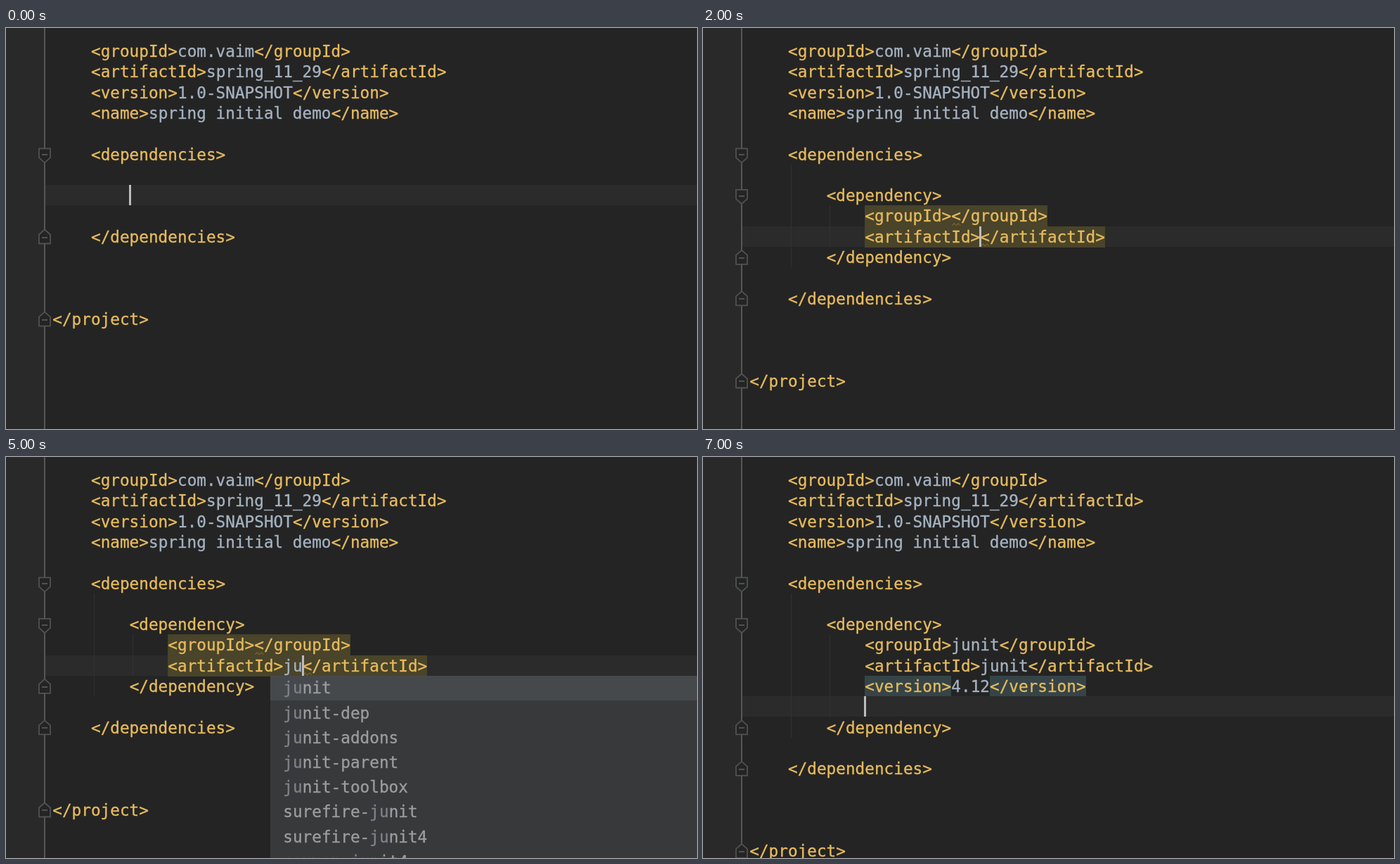
These frames come from a looping animation (983x570 px, 8000 ms). An HTML page with a canvas:

```html
<!DOCTYPE html>
<html lang="en">
<head>
<meta charset="utf-8">
<title>Adding a dependency</title>
<style>
  html, body { margin: 0; width: 100%; height: 100%; overflow: hidden; background: #242424; }
  canvas { display: block; }
</style>
</head>
<body>
<canvas id="stage" width="983" height="570"></canvas>
<script>
const ctx = document.getElementById('stage').getContext('2d');
const W = 983, H = 570;
const LEFT = 66.3, TOP = 18, CHAR = 13.667, LINE = 29.28, ITEM = 35.2;
const GUTTER_X = 55, STEP_MS = 1000;

const color = {
  back: '#242424', gutter: '#292929', rule: '#565656', fold: '#505252',
  row: '#2b2b2b', guide: '#303232', tag: '#e7bb5e', text: '#a5b2c1',
  caret: '#bcbcbc', field: '#49442a', pair: '#364447', wave: '#77602a',
  popup: '#37393b', hover: '#46494b', picked: '#0450a5',
  item: '#9b9da0', match: '#7e818a', pickable: '#b9bbbd'
};

const colX = col => LEFT + col * CHAR;
const rowY = row => TOP + row * LINE;

const head = [
  '    <groupId>com.vaim</groupId>',
  '    <artifactId>spring_11_29</artifactId>',
  '    <version>1.0-SNAPSHOT</version>',
  '    <name>spring initial demo</name>',
  '',
  '    <dependencies>',
  ''
];
const tail = ['', '    </dependencies>', '', '', '', '</project>'];

const tagLine = (name, value) => `            <${name}>${value}</${name}>`;
const dependency = (group, artifact, ...rest) => [
  '        <dependency>',
  tagLine('groupId', group),
  tagLine('artifactId', artifact),
  ...rest,
  '        </dependency>'
];

// Caret is [row, column]; fields marks the two editable template lines.
const blank = { body: [''], caret: [7, 8] };
const shortcut = { body: ['        dep'], caret: [7, 11] };
const template = { body: dependency('', ''), caret: [9, 24], fields: true };
const search = (typed, items) => ({
  body: dependency('', typed), caret: [9, 24 + typed.length], fields: true,
  popup: { x: 376, row: 10, typed, items, fill: color.hover }
});
const versions = {
  body: dependency('junit', 'junit', tagLine('version', '')),
  caret: [10, 21], fields: true,
  popup: {
    x: 335, row: 11, typed: '', fill: color.picked,
    items: ['4.12', '4.11', '4.11-beta-1', '4.10', '4.7', '4.4', '3.8.2']
  }
};
const done = {
  body: dependency('junit', 'junit', tagLine('version', '4.12'), ''),
  caret: [11, 12], pairs: [[12, 9], [25, 10]]
};

const steps = [
  blank,
  shortcut,
  template,
  search('gu', ['guava', 'guava-parent', 'guice-bean', 'guice-parent', 'guice-plexus',
    'sisu-guice', 'commons-configuration', 'mybatis-spring-boot-autoconfigure']),
  template,
  search('ju', ['junit', 'junit-dep', 'junit-addons', 'junit-parent', 'junit-toolbox',
    'surefire-junit', 'surefire-junit4', 'common-junit4']),
  versions,
  done
];

function rect(x, y, w, h, fill) {
  ctx.fillStyle = fill;
  ctx.fillRect(Math.round(x), Math.round(y), Math.round(w), Math.round(h));
}

function write(text, x, y, fill) {
  ctx.fillStyle = ctx.strokeStyle = fill;
  ctx.lineWidth = 0.35;
  ctx.fillText(text, x, y);
  ctx.strokeText(text, x, y);
}

function writeParts(parts, x, y, pickColor) {
  for (const part of parts) {
    if (part.trim()) write(part, x, y, pickColor(part));
    x += part.length * CHAR;
  }
}

function drawFold(row, down) {
  const mid = rowY(row) + 16;
  const s = down ? 1 : -1;
  ctx.beginPath();
  ctx.moveTo(GUTTER_X - 8, mid - 9 * s);
  ctx.lineTo(GUTTER_X + 8, mid - 9 * s);
  ctx.lineTo(GUTTER_X + 8, mid + 4 * s);
  ctx.lineTo(GUTTER_X, mid + 11 * s);
  ctx.lineTo(GUTTER_X - 8, mid + 4 * s);
  ctx.closePath();
  ctx.fillStyle = color.back;
  ctx.fill();
  ctx.strokeStyle = color.fold;
  ctx.lineWidth = 1.8;
  ctx.stroke();
  rect(GUTTER_X - 4, mid - 1, 8, 2, color.fold);
}

function drawWave(row, col) {
  const y = rowY(row) + 27;
  ctx.beginPath();
  for (let i = 0; i <= 4; i++) ctx.lineTo(colX(col) + 1 + i * 3, y + (i % 2 ? -1.5 : 1.5));
  ctx.strokeStyle = color.wave;
  ctx.lineWidth = 1.3;
  ctx.stroke();
}

function drawGuide(col, fromRow, toRow) {
  rect(colX(col) + 4, rowY(fromRow), 1, rowY(toRow) - rowY(fromRow), color.guide);
}

function drawPopup({ x, row, typed, items, fill }) {
  const top = Math.round(rowY(row));
  rect(x, top, W - x, H - top, color.popup);
  rect(x, top, W - x, ITEM, fill);
  items.forEach((item, i) => {
    const parts = typed ? item.split(new RegExp(`(${typed})`)) : [item];
    const plain = typed ? color.item : color.pickable;
    writeParts(parts, x + 18.3, top + 25.3 + i * ITEM,
      part => part === typed ? color.match : plain);
  });
}

function draw({ body, caret, fields, pairs = [], popup }) {
  const lines = [...head, ...body, ...tail];
  const [caretRow, caretCol] = caret;
  rect(0, 0, W, H, color.back);
  rect(0, 0, 54, H, color.gutter);
  rect(56, rowY(caretRow), W - 56, LINE, color.row);
  rect(54, 0, 2, H, color.rule);

  if (body.length > 1) {
    const end = head.length + body.length;
    drawGuide(4, 6, end);
    drawGuide(8, 8, end - 1);
  }
  if (fields) {
    for (const row of [8, 9]) {
      rect(colX(12), rowY(row), (lines[row].length - 12) * CHAR, LINE + 0.5, color.field);
      drawWave(row, lines[row].indexOf('</'));
    }
  }
  for (const [col, length] of pairs) rect(colX(col), rowY(10), length * CHAR, LINE, color.pair);

  lines.forEach((line, row) => {
    writeParts(line.split(/(<[^>]*>)/), LEFT, rowY(row) + 23.2,
      part => part[0] === '<' ? color.tag : color.text);
    const fold = line.match(/^\s*<(\/?)(dependenc|project)/);
    if (fold) drawFold(row, !fold[1]);
  });

  rect(colX(caretCol) - 1, rowY(caretRow), 3, LINE, color.caret);
  if (popup) drawPopup(popup);
}

function tick() {
  ctx.font = '22.7px "DejaVu Sans Mono", monospace';
  ctx.textBaseline = 'alphabetic';
  const step = Math.floor(performance.now() / STEP_MS) % steps.length;
  draw(steps[step]);
  requestAnimationFrame(tick);
}
tick();
</script>
</body>
</html>
```
